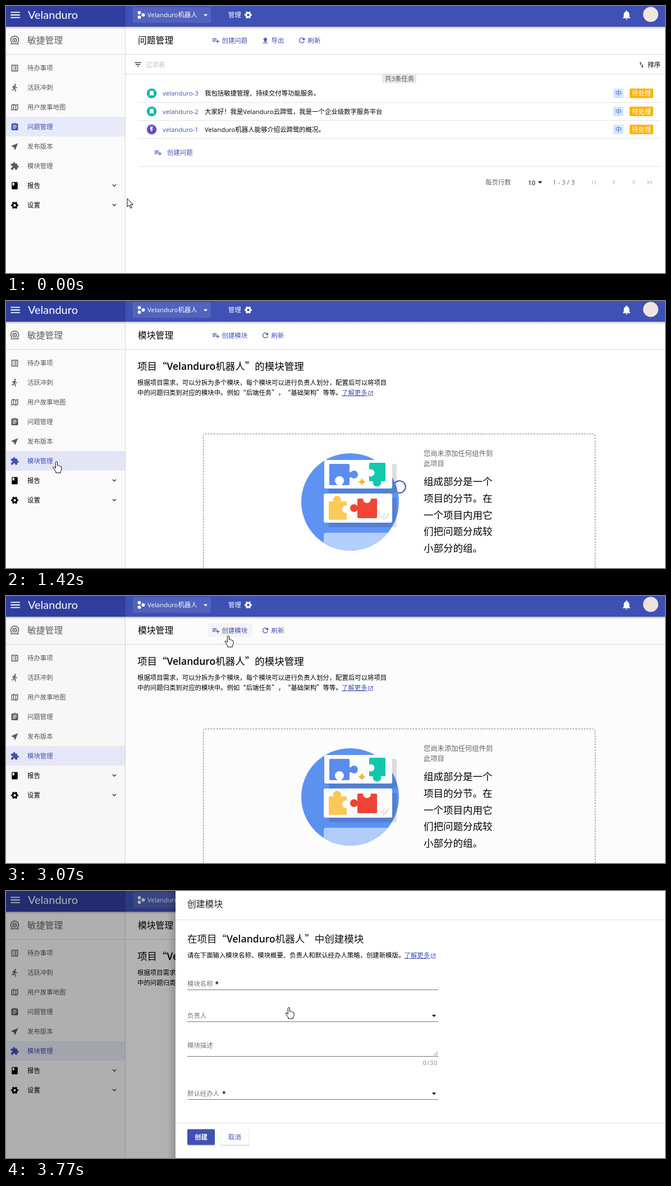
Recreate the animation shown at these times as an HTML page. Size 1174 by 477 pixels, loop 3.85 s.

```html
<!DOCTYPE html>
<html lang="zh-CN">
<head>
<meta charset="utf-8">
<title>模块管理</title>
<style>
html, body { margin: 0; width: 100%; height: 100%; overflow: hidden; background: #fff; }
svg { display: block; width: 1174px; height: 477px; }
text { font-family: "Open Sans", "Noto Sans CJK SC", "Noto Sans CJK", sans-serif; white-space: pre; text-spacing-trim: space-all; }
.q { font-family: "Noto Sans CJK SC", "Noto Sans CJK", sans-serif; }
.brand { font-family: Lato, sans-serif; }
</style>
</head>
<body>
<svg id="stage" viewBox="0 0 1174 477"></svg>
<script>
const LOOP = 3850;
const NAME = 'Velanduro', KIN = '云蹄鹭', PROJECT = NAME + '机器人';
const BLUE = '#3f51b5', GREY = '#595959';

// Moments at which the screen is refreshed.
const TICKS = [0, 100, 180, 250, 330, 400, 480, 550, 640, 740, 850, 950, 1050, 1110,
  1180, 1260, 1340, 1420, 1500, 1590, 1670, 1740, 1820, 1900, 1990, 2070, 2150, 2230,
  2320, 2400, 2480, 2560, 2640, 2720, 2780, 2870, 2940, 3020, 3100, 3180, 3240, 3320,
  3380, 3460, 3540, 3610, 3690, 3770];

// Pointer path: time, x, y of the tip.
const PATH = [[0, 216, 344], [20, 216, 344], [550, 90, 290], [850, 87, 288], [1050, 87, 288],
  [1400, 90, 287], [1670, 90, 287], [2230, 400, 101], [2250, 400, 101], [2720, 396, 71],
  [3390, 396, 71], [3770, 504, 208]];

const ICONS = {
  menu: 'M3 18h18v-2H3zM3 13h18v-2H3zM3 6v2h18V6z',
  list: 'M19 5v14H5V5h14m1.1-2H3.9c-.5 0-.9.4-.9.9v16.2c0 .4.4.9.9.9h16.2c.4 0 .9-.5.9-.9V3.9c0-.5-.5-.9-.9-.9zM11 7h6v2h-6zM11 11h6v2h-6zM11 15h6v2h-6zM7 7h2v2H7zM7 11h2v2H7zM7 15h2v2H7z',
  run: 'M13.5 5.5c1.1 0 2-.9 2-2s-.9-2-2-2-2 .9-2 2 .9 2 2 2zm-3.6 13.9l1-4.4 2.1 2v6h2v-7.5l-2.1-2 .6-3c1.3 1.5 3.3 2.5 5.5 2.5v-2c-1.9 0-3.5-1-4.3-2.4l-1-1.6c-.4-.6-1-1-1.7-1-.3 0-.5.1-.8.1L6 8.3V13h2V9.6l1.8-.7-1.6 8.1-4.9-1-.4 2z',
  map: 'M20.5 3L15 5.1 9 3 3 5v16l6-2.1 6 2.1 6-2V3zM10 5.5l4 1.4v11.6l-4-1.4zM5 6.5l3-1v11.6l-3 1.2zM19 17.5l-3 1V6.9l3-1.2z',
  task: 'M19 3h-4.2C14.4 1.8 13.3 1 12 1s-2.4.8-2.8 2H5c-1.1 0-2 .9-2 2v14c0 1.1.9 2 2 2h14c1.1 0 2-.9 2-2V5c0-1.1-.9-2-2-2zm-7 0c.6 0 1 .4 1 1s-.4 1-1 1-1-.4-1-1 .4-1 1-1zm2 14H7v-2h7zm3-4H7v-2h10zm0-4H7V7h10z',
  send: 'M21 3L3 10.5v1l6.8 2.7 2.7 6.8h1z',
  puzzle: 'M20.5 11H19V7c0-1.1-.9-2-2-2h-4V3.5a2.5 2.5 0 0 0-5 0V5H4c-1.1 0-2 .9-2 2v3.8h1.5a2.7 2.7 0 0 1 0 5.4H2V20c0 1.1.9 2 2 2h3.8v-1.5a2.7 2.7 0 0 1 5.4 0V22H17c1.1 0 2-.9 2-2v-4h1.5a2.5 2.5 0 0 0 0-5z',
  book: 'M18 2H6c-1.1 0-2 .9-2 2v16c0 1.1.9 2 2 2h12c1.1 0 2-.9 2-2V4c0-1.1-.9-2-2-2zM6 4h5v8l-2.5-1.5L6 12z',
  bell: 'M12 22c1.1 0 2-.9 2-2h-4c0 1.1.9 2 2 2zm6-6v-5c0-3.1-1.6-5.6-4.5-6.3V4a1.5 1.5 0 0 0-3 0v.7C7.6 5.4 6 7.9 6 11v5l-2 2v1h16v-1z',
  add: 'M14 10H2v2h12zM14 6H2v2h12zM18 14v-4h-2v4h-4v2h4v4h2v-4h4v-2zM2 16h8v-2H2z',
  upload: 'M9 16h6v-6h4l-7-7-7 7h4zM5 18h14v2H5z',
  refresh: 'M17.6 6.4A8 8 0 1 0 19.7 14h-2.1A6 6 0 1 1 16.2 7.8L13 11h7V4z',
  filter: 'M10 18h4v-2h-4zM3 6v2h18V6zM6 13h12v-2H6z',
  sort: 'M16 17v-7h-2v7h-3l4 4 4-4zM9 3L5 7h3v7h2V7h3z',
  mark: 'M17 3H7c-1.1 0-2 .9-2 2v16l7-3 7 3V5c0-1.1-.9-2-2-2z',
  bolt: 'M7 2v11h3v9l7-12h-4l4-8z',
  open: 'M19 19H5V5h7V3H5c-1.1 0-2 .9-2 2v14c0 1.1.9 2 2 2h14c1.1 0 2-.9 2-2v-7h-2zM14 3v2h3.6l-9.8 9.8 1.4 1.4L19 6.4V10h2V3z',
  down: 'M16.6 8.6L12 13.2 7.4 8.6 6 10l6 6 6-6z',
  left: 'M15.4 7.4L14 6l-6 6 6 6 1.4-1.4-4.6-4.6z',
  right: 'M10 6L8.6 7.4l4.6 4.6-4.6 4.6L10 18l6-6z',
  first: 'M18.4 16.6L13.8 12l4.6-4.6L17 6l-6 6 6 6zM6 6h2v12H6z',
  last: 'M5.6 7.4l4.6 4.6-4.6 4.6L7 18l6-6-6-6zM16 6h2v12h-2z'
};

const text = (x, cy, s, fill = '#000', size = 11.4, extra = '') =>
  `<text x="${x}" y="${cy + size * 0.37}" font-size="${size}" fill="${fill}" ${extra}>` +
  s.replace(/[“”]/g, '<tspan class="q">$&</tspan>') + '</text>';
const rect = (x, y, w, h, fill, extra = '') =>
  `<rect x="${x}" y="${y}" width="${w}" height="${h}" fill="${fill}" ${extra}/>`;
const disc = (x, y, r, fill, extra = '') => `<circle cx="${x}" cy="${y}" r="${r}" fill="${fill}" ${extra}/>`;
const hline = (x, y, x2, color = '#e2e2e2') => rect(x, y, x2 - x, 1, color);
const icon = (name, cx, cy, size, fill) =>
  `<path d="${ICONS[name]}" fill="${fill}" fill-rule="evenodd" transform="translate(${cx - size / 2} ${cy - size / 2}) scale(${size / 24})"/>`;
const gear = (x, y, fill) =>
  `<g fill="none" stroke="${fill}"><circle cx="${x}" cy="${y}" r="3.7" stroke-width="3"/>` +
  `<circle cx="${x}" cy="${y}" r="5.6" stroke-width="2" pathLength="12" stroke-dasharray="1 1" stroke-dashoffset=".5"/></g>`;
const caret = (x, y, fill = '#000') => `<path d="M${x - 3.7} ${y - 1.7}h7.4l-3.7 3.7z" fill="${fill}"/>`;
const group = (id, body, extra = '') => `<g id="${id}" ${extra}>${body}</g>`;
const tool = (name, x, label) => icon(name, x, 61.5, 15, BLUE) + text(x + 10.5, 61.5, label, BLUE);
const link = (x, cy) => text(x, cy, '了解更多', BLUE) + hline(x, cy + 5, x + 46, BLUE) + icon('open', x + 51.5, cy + 1, 11, BLUE);
const BOLD = `<tspan font-weight="600">${NAME}</tspan><tspan font-weight="500">机器人</tspan>`;

function header() {
  return rect(0, 37, 1174, 4, 'url(#under)') + rect(0, 0, 1174, 37, BLUE) + rect(0, 0, 213, 37, '#303f9f') +
    icon('menu', 16.5, 16, 22, '#fff') +
    `<text class="brand" x="39" y="23" font-size="20" fill="#fff">${NAME}</text>` +
    rect(226, 2, 139, 28, '#5363be', 'rx="2"') +
    disc(237.5, 12, 3, '#fff') + disc(237.5, 20, 3, '#fff') + disc(244.5, 16, 3, '#fff') +
    text(252, 16, PROJECT, '#fff') + caret(355.5, 16.5, '#fff') +
    text(396, 16, '管理', '#fff') + gear(431.5, 16, '#fff') +
    icon('bell', 1105.5, 16, 20, '#fff') + disc(1148.5, 15, 13.5, '#f0e6e0');
}

const MENU = [['list', '待办事项'], ['run', '活跃冲刺'], ['map', '用户故事地图'], ['task', '问题管理'],
  ['send', '发布版本'], ['puzzle', '模块管理'], ['book', '报告'], ['gear', '设置']];

function sidebar() {
  const rows = MENU.map(([name, label], i) => {
    const cy = 111 + i * 35, dark = i > 5, color = dark ? '#000' : GREY;
    const mark = name === 'gear' ? gear(15.5, cy, color) : icon(name, 15.5, cy, 15.8, color);
    return group('item' + i, mark + text(38, cy, label, color) +
      (dark ? icon('down', 193, cy - 0.5, 14, '#000') : ''));
  }).join('');
  return rect(0, 37, 212, 440, '#fafafa') + rect(212, 37, 1, 440, '#d6d6d6') +
    `<g fill="none" stroke="${GREY}" stroke-width="1.5"><path d="M11 66a7 7 0 1 1 9 0M8 67.5h15"/>` +
    '<circle cx="15.5" cy="61" r="3.3"/></g>' + disc(15.5, 61, 1.2, GREY) +
    text(38, 61, '敏捷管理', '#616161', 15.8) +
    rect(0, 198, 212, 35, '#e8eaf9', 'id="picked"') + rect(0, 268, 212, 35, '#f0f0f0', 'id="pressed"') +
    disc(87, 286, 0, '#e0e0e0', 'id="ripple" clip-path="url(#row)"') + rows;
}

function issueList() {
  const rows = [['mark', '#0fb9a8', '我包括敏捷管理、持续交付等功能服务。'],
    ['mark', '#0fb9a8', `大家好！我是${NAME}${KIN}，我是一个企业级数字服务平台`],
    ['bolt', '#6a4bc4', `${PROJECT}能够介绍${KIN}的概况。`]];
  const nav = [['first', 1048], ['left', 1083], ['right', 1118], ['last', 1146]];
  return icon('filter', 235, 104.5, 15.8, '#222') + text(249, 104.5, '过滤表', '#bfbfbf') +
    icon('sort', 1132, 105, 13, '#222') + text(1143, 105, '排序') + hline(213, 121, 1174, '#dcdcdc') +
    rect(670, 122, 61, 16, '#e8e8e8') + text(675, 130, '共3条任务', '#555') +
    rows.map(([name, color, label], i) => {
      const cy = 156 + i * 32.3;
      return disc(259.5, cy, 8.8, color) + icon(name, 259.5, cy, 12, '#fff') +
        text(279, cy, NAME.toLowerCase() + '-' + (3 - i), BLUE) + text(354, cy, label) +
        rect(1082, cy - 8.5, 18, 17, '#d8e5fb') + text(1085.5, cy, '中', '#3f73d9') +
        rect(1111, cy - 8.5, 42, 17, '#ffb100', 'rx="2"') + text(1115, cy, '待处理', '#fff', 11.4, 'font-weight="500"') +
        hline(235, Math.round(cy + 15.5), 1167);
    }).join('') +
    icon('add', 271, 262, 15, BLUE) + text(287, 261.5, '创建问题', BLUE) + hline(235, 286, 1167) +
    text(854, 315, '每页行数', '#616161') + text(930, 315.5, '10') + caret(951.5, 315) +
    text(974, 315, '1 - 3 / 3', '#616161') + nav.map(([n, x]) => icon(n, x, 315, 15, '#bdbdbd')).join('');
}

function intro() {
  return text(234, 117, `项目“${BOLD}”的模块管理`, '#000', 17.5) +
    text(234, 146, '根据项目需求，可以分拆为多个模块，每个模块可以进行负责人划分，配置后可以将项目') +
    text(234, 164, '中的问题归类到对应的模块中。例如“后端任务”，“基础架构”等等。') + link(598, 164);
}

function pieces() {
  const [blue, green, gold, red] = ['#5b8df0', '#12c8ae', '#fdca58', '#f14537'];
  return rect(576, 291, 36, 38, blue, 'rx="2"') + rect(609, 306, 8, 9, blue) + disc(620, 310, 7, blue) +
    disc(594, 321, 8, '#fff') + rect(590, 325, 8, 5, '#fff') +
    rect(647, 289, 29, 33, green, 'rx="2"') + disc(661, 324, 7.5, green) + disc(650, 307, 6.5, '#fff') +
    '<path d="M634 316q1.5 5.5 7 7-5.5 1.5-7 7-1.5-5.5-7-7 5.5-1.5 7-7z" fill="#f9b32c"/>' +
    rect(575, 358, 32, 33, gold, 'rx="2"') + disc(590, 355, 7, gold) + disc(605, 372, 6.5, '#fff') +
    rect(626, 353, 35, 35, red, 'rx="2"') + disc(620, 370, 7, red) + disc(643, 354, 7, '#fff') +
    '<path d="M667 387q6-1 7-7M671 390q8-2 10-11" fill="none" stroke="#dcdcdc" stroke-width="2"/>';
}

function emptyState() {
  return '<rect x="351.5" y="237.5" width="698" height="300" rx="3" fill="none" stroke="#777" stroke-dasharray="3 2"/>' +
    disc(613, 359, 87, '#5e93f3') +
    rect(566, 414, 118, 34, '#b4cefd', 'rx="4" clip-path="url(#globe)"') +
    rect(575, 291, 121, 52, '#000', 'rx="3" opacity=".13"') + rect(575, 352, 121, 52, '#000', 'rx="3" opacity=".13"') +
    rect(567, 284, 121, 51, '#fff', 'rx="3"') + rect(566, 344, 122, 52, '#fff', 'rx="3"') + pieces() +
    text(744, 272.5, '您尚未添加任何组件到', '#666', 12.3) + text(744, 290, '此项目', '#666', 12.3) +
    ['组成部分是一个', '项目的分节。在', '一个项目内用它', '们把问题分成较', '小部分的组。']
      .map((s, i) => text(744, 322.5 + i * 29.8, s, '#000', 17.5)).join('');
}

function drawer() {
  const field = (cy, label, y) => text(323, cy, label, '#757575') + hline(323, y, 770, '#757575');
  const star = (x, cy) => text(x, cy + 1, '*', '#000', 12, 'font-weight="600"');
  return rect(286, 0, 16, 477, 'url(#edge)') + rect(302, 0, 872, 477, '#fff') +
    text(323, 23, '创建模块', '#222', 15.8) + hline(302, 51, 1174) +
    text(323, 86, `在项目“${BOLD}”中创建模块`, '#111', 17.5) +
    text(323, 115, '请在下面输入模块名称、模块概要、负责人和默认经办人策略，创建新模版。') + link(709.5, 115) +
    field(166, '模块名称', 176) + star(372.5, 166) + field(223, '负责人', 233) + caret(762.5, 223) +
    field(276, '模块描述', 295) + '<path d="M762 294l7-7M766 294l3-3" stroke="#777"/>' +
    text(742.5, 307, '0/30', '#8c8c8c', 11.4, 'letter-spacing=".8"') +
    field(362, '默认经办人', 372) + star(385, 362) + caret(762.5, 362) + hline(302, 414, 1174) +
    rect(323, 427, 49, 28, '#000', 'rx="2" opacity=".2"') + rect(323, 425.5, 49, 28, BLUE, 'rx="2"') +
    text(336, 439.5, '创建', '#fff', 11.4, 'font-weight="600"') +
    rect(382, 426, 51, 29, '#000', 'rx="2" opacity=".18"') + rect(382.5, 425.5, 50, 28, '#fff', 'rx="2"') +
    text(396, 439.5, '取消', BLUE);
}

const stage = document.getElementById('stage');
stage.innerHTML = `<defs>
  <linearGradient id="under" x2="0" y2="1"><stop stop-opacity=".25"/><stop offset="1" stop-opacity="0"/></linearGradient>
  <linearGradient id="edge"><stop stop-opacity="0"/><stop offset="1" stop-opacity=".16"/></linearGradient>
  <clipPath id="row"><rect y="268" width="212" height="35"/></clipPath>
  <clipPath id="globe"><circle cx="613" cy="359" r="87"/></clipPath></defs>` +
  rect(0, 0, 1174, 477, '#fff') + sidebar() + hline(0, 86, 1174, '#d8d8d8') +
  group('issueBar', text(235, 61.5, '问题管理', '#000', 15.8) + tool('add', 374, '创建问题') +
    tool('upload', 462, '导出') + tool('refresh', 527, '刷新')) +
  group('moduleBar', text(235, 61.5, '模块管理', '#000', 15.8) + rect(359, 49, 80, 24, '#f6f6f6', 'id="hover" rx="2"') +
    tool('add', 374, '创建模块') + tool('refresh', 462, '刷新')) +
  group('issues', issueList()) + group('intro', intro()) + group('empty', emptyState()) +
  `<circle id="spinner" cx="701" cy="332" r="10.8" fill="none" stroke="${BLUE}" stroke-width="2" pathLength="100" stroke-dasharray="68 32"/>` +
  header() + rect(0, 0, 1174, 477, '#000', 'id="mask"') + group('drawer', drawer()) +
  group('pointer', '<path id="arrow" d="M0 0V15l3.5-3.3 2.4 5.5 2.3-1-2.4-5.3h4.8z"/>' +
    '<path id="hand" d="M-1.7 12V1.7a1.6 1.6 0 0 1 3.2 0V7q2.3-1 2.8.7 2-.8 2.5.8 2.2-.6 2.2 1.4v4q0 2-1.6 3.6V20H-1.2v-2.2L-5.6 11.5q-.8-2 1-2.2 1.3 0 2.9 2.7z"/>',
    'fill="#fff" stroke="#000" stroke-linejoin="round"');

const el = id => document.getElementById(id);
const show = (id, on) => { el(id).style.display = on ? '' : 'none'; };
const set = (id, attrs) => { for (const k in attrs) el(id).setAttribute(k, attrs[k]); };
const clamp = v => Math.max(0, Math.min(1, v));
const smooth = v => v * v * (3 - 2 * v);

function paint(index, color) {
  el('item' + index).querySelectorAll('text, path').forEach(n => n.setAttribute('fill', color));
}

function pointerAt(t) {
  const i = PATH.findIndex(p => p[0] > t);
  if (i < 0) return PATH[PATH.length - 1].slice(1);
  const a = PATH[i - 1], b = PATH[i], k = smooth((t - a[0]) / (b[0] - a[0]));
  return [a[1] + (b[1] - a[1]) * k, a[2] + (b[2] - a[2]) * k];
}

function draw(time) {
  const t = TICKS.filter(v => v <= time).pop();
  const [x, y] = pointerAt(t);
  const moved = t >= 1110, opened = t >= 3110;
  const onRow = x < 212 && y >= 268 && y < 303;
  const onButton = !opened && t > 2230 && y < 73;
  const onMenu = x < 212 && y > 94 && y < 373;

  set('picked', { y: moved ? 268 : 198, fill: moved && onRow ? '#e3e5f6' : '#e8eaf9' });
  paint(3, moved ? GREY : BLUE);
  paint(5, moved || onRow ? BLUE : GREY);
  show('pressed', t >= 850 && !moved);
  set('ripple', { r: moved ? 0 : Math.max(0, (t - 850) * 0.8) });

  show('issueBar', t < 1180);
  show('moduleBar', t >= 1180);
  show('hover', onButton || t >= 2720);
  show('issues', !moved);
  show('intro', t >= 1260);
  show('empty', t >= 1340);
  show('spinner', moved && t < 1820);
  set('spinner', { transform: `rotate(${(t - 1420) * 0.26 - 140} 701 332)` });

  const p = 1 - Math.pow(1 - clamp((t - 3108) / 200), 5);
  const s = 0.8 + 0.2 * p;
  set('mask', { opacity: 0.3 * clamp((t - 3010) / 300) });
  show('drawer', opened);
  set('drawer', { opacity: p, transform: `translate(${1174 * (1 - s)} 0) scale(${s} 1)` });

  const hand = onMenu || onButton || (opened && y > 205);
  show('hand', hand);
  show('arrow', !hand);
  set('pointer', { transform: `translate(${x} ${y})` });
}

function loop() {
  draw(performance.now() % LOOP);
  requestAnimationFrame(loop);
}
loop();
</script>
</body>
</html>
```
